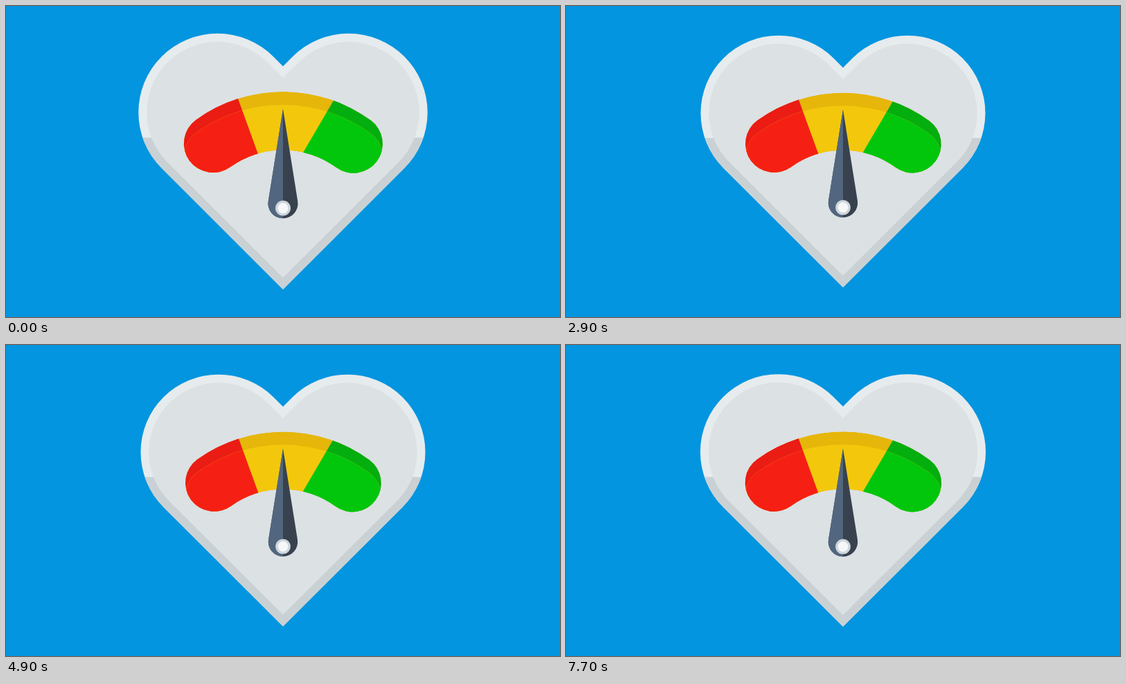
Write an HTML page with a canvas that moves like this. It is 800 px wide and 450 px high and loops after 7.8 s.

```html
<!DOCTYPE html>
<html lang="en">
<head>
<meta charset="utf-8">
<title>Heart gauge</title>
<style>
  html, body { margin: 0; width: 100%; height: 100%; overflow: hidden; background: #0395df; }
  canvas { display: block; }
</style>
</head>
<body>
<canvas id="stage" width="800" height="450"></canvas>
<script>
const ctx = document.getElementById('stage').getContext('2d');
const LOOP = 7800, STEP = 100, BEAT = 1000, TAU = Math.PI * 2;
const REST = 208.5; // half width of the heart at scale 1

function heart(r) {
  const p = new Path2D(), q = Math.PI / 4, dx = 94.5, cy = 154;
  const reach = r * Math.SQRT2;
  p.moveTo(400, cy + dx + reach);
  p.arc(400 - dx, cy, r, 3 * q, 7 * q);
  p.lineTo(400, cy + dx - reach);
  p.arc(400 + dx, cy, r, 5 * q, 9 * q);
  p.closePath();
  return p;
}

// Arc-shaped band with round ends
function band(dy) {
  const p = new Path2D(), y = 338 + dy, mid = 171.8, w = 42.2, a = -2.198, b = -0.938;
  const cap = t => p.arc(400 + mid * Math.cos(t), y + mid * Math.sin(t), w,
    t === a ? a + Math.PI : b, t === a ? a + TAU : b + Math.PI);
  p.arc(400, y, mid + w, a, b);
  cap(b);
  p.arc(400, y, mid - w, b, a, true);
  cap(a);
  p.closePath();
  return p;
}

function disc(x, y, r) {
  const p = new Path2D();
  p.arc(x, y, r, 0, TAU);
  return p;
}

function fill(path, color) {
  ctx.fillStyle = color;
  ctx.fill(path);
}

function clipped(path, draw) {
  ctx.save();
  ctx.clip(path);
  draw();
  ctx.restore();
}

const below = new Path2D();
below.rect(0, 190.5, 800, 260);
const leftHalf = new Path2D();
leftHalf.rect(300, 100, 100, 250);

const rim = heart(114), face = heart(102);
const gauge = band(0), lit = band(19);
const leftZone = new Path2D('M200 100H322.7L371.2 234V300H200Z');
const rightZone = new Path2D('M494.4 100L416.2 234V300H600V100Z');
const needle = new Path2D('M400 149L378.8 282.1A21.5 21.5 0 1 0 421.2 282.1Z');

function zones(red, yellow, green) {
  fill(gauge, yellow);
  fill(leftZone, red);
  fill(rightZone, green);
}

function scaleAt(t) {
  const x = TAU * (t / BEAT - 0.81);
  return (209.1 - 3.6 * Math.cos(x) - 1.3 * Math.cos(2 * x)) / REST;
}

function frame(now) {
  const t = Math.floor(now % LOOP / STEP) * STEP;
  const s = scaleAt(t);
  ctx.setTransform(1, 0, 0, 1, 0, 0);
  ctx.fillStyle = '#0395df';
  ctx.fillRect(0, 0, 800, 450);
  ctx.setTransform(s, 0, 0, s, 400 * (1 - s), 225 * (1 - s));

  fill(rim, '#e6ebee');
  clipped(below, () => fill(rim, '#cad1d4'));
  fill(face, '#dce1e4');

  clipped(gauge, () => {
    zones('#ea1c14', '#e6b60a', '#04ae0e');
    clipped(lit, () => zones('#f52013', '#f3c80c', '#02c60c'));
  });

  fill(needle, '#38424e');
  clipped(leftHalf, () => fill(needle, '#52667f'));
  fill(disc(400, 292.5, 11), '#ced5db');
  fill(disc(400, 292.5, 7.6), '#f5f7f9');
  requestAnimationFrame(frame);
}
frame(0);
</script>
</body>
</html>
```
